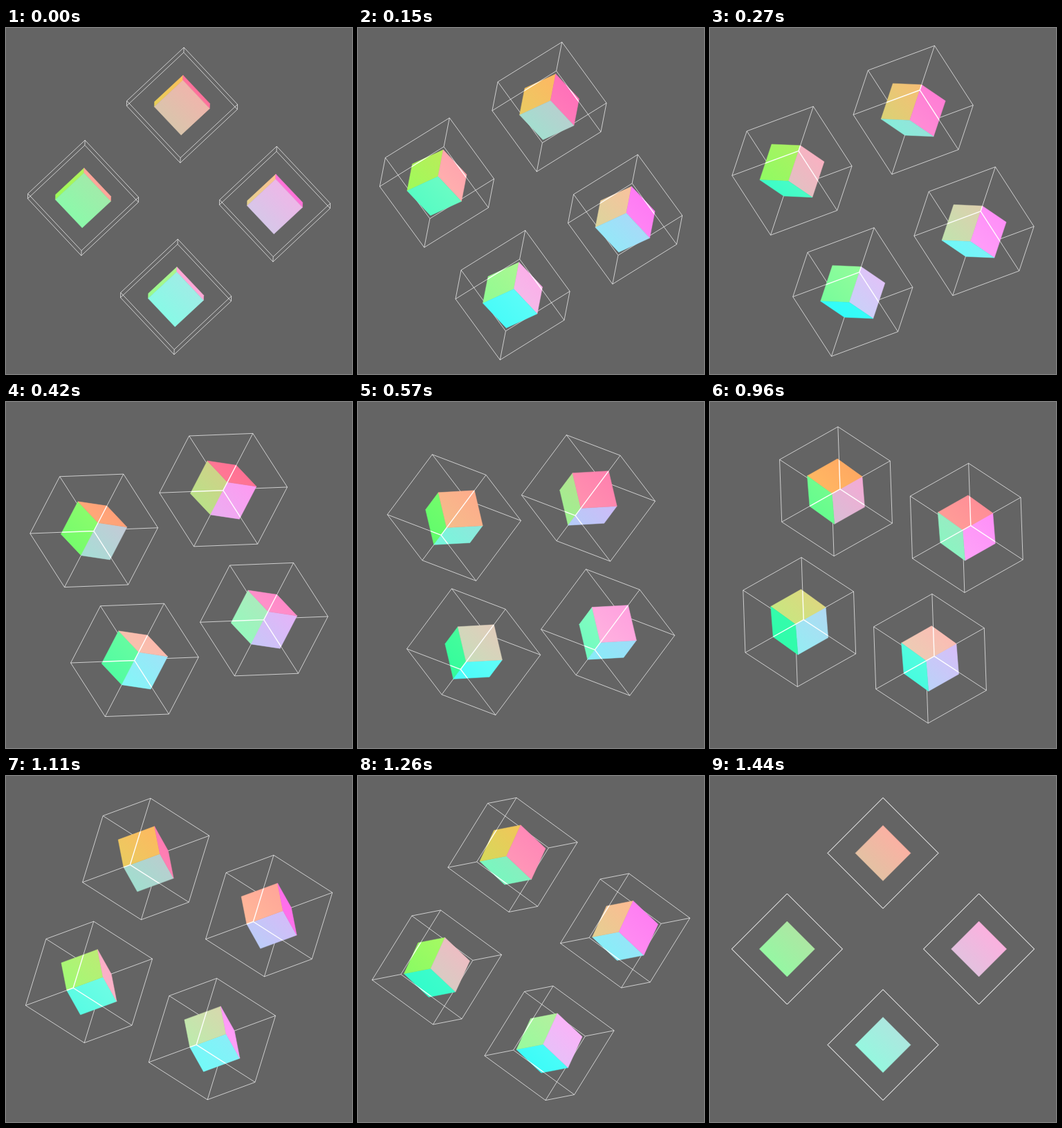
Recreate the animation shown at these times as an HTML page with a canvas. Size 500 by 500 pixels, loop 1.47 s.

```html
<!DOCTYPE html>
<html>
<head>
<meta charset="utf-8">
<style>
html, body { margin: 0; width: 100%; height: 100%; overflow: hidden; background: #646464; }
canvas { display: block; width: 500px; height: 500px; }
</style>
</head>
<body>
<canvas id="stage" width="500" height="500"></canvas>
<script>
const ctx = document.getElementById('stage').getContext('2d');
const STEP = 30, STEPS = 49, MID = 250;
const ORBIT = 98 * Math.SQRT2;
const WIRE = 40 * Math.SQRT2, SOLID = WIRE / 2; // half sides
const SIGNS = [-1, 1], EPS = 1e-6;

// Cube axes tilted about x, then turned in the picture plane; z faces the viewer.
function cubeAxes(turn, tilt) {
  const h = Math.SQRT1_2;
  const c = Math.cos(turn), s = Math.sin(turn);
  return [[h, h, 0], [-h, h, 0], [0, 0, 1]].map(([x, y, z]) => {
    const y2 = y * Math.cos(tilt) + z * Math.sin(tilt);
    const z2 = z * Math.cos(tilt) - y * Math.sin(tilt);
    return [x * c - y2 * s, x * s + y2 * c, z2];
  });
}

// Projected sum of signed axes around a centre.
function corner([cx, cy], half, terms) {
  let x = cx, y = cy;
  for (const [sign, axis] of terms) {
    x += half * sign * axis[0];
    y += half * sign * axis[1];
  }
  return [x, y];
}

function wirePath(center, axes, frontOnly) {
  const path = new Path2D();
  axes.forEach((along, k) => {
    const u = axes[(k + 1) % 3], v = axes[(k + 2) % 3];
    for (const su of SIGNS) for (const sv of SIGNS) {
      if (frontOnly && su * u[2] < EPS && sv * v[2] < EPS) continue;
      path.moveTo(...corner(center, WIRE, [[su, u], [sv, v], [-1, along]]));
      path.lineTo(...corner(center, WIRE, [[su, u], [sv, v], [1, along]]));
    }
  });
  return path;
}

// Coloured light: red from upper right, green from the left, blue from lower right.
function shade(nx, ny, px, py) {
  const x = (px - MID) / ORBIT, y = (py - MID) / ORBIT;
  const rgb = [
    200 + 81 * (nx - ny) + 39 * (x - y),
    212 - 57 * nx + 33 * ny - 27 * (x - y),
    193 + 44 * nx + 59 * ny + 30 * (x + y)
  ];
  const limits = [[45, 255], [105, 252], [90, 248]];
  return `rgb(${rgb.map((v, i) => Math.round(Math.min(limits[i][1], Math.max(limits[i][0], v))))})`;
}

function drawSolid(center, axes) {
  const outline = new Path2D();
  axes.forEach((axis, k) => {
    if (Math.abs(axis[2]) < EPS) return;
    const sign = Math.sign(axis[2]);
    const u = axes[(k + 1) % 3], v = axes[(k + 2) % 3];
    const face = new Path2D();
    for (const [su, sv] of [[-1, -1], [1, -1], [1, 1], [-1, 1]]) {
      face.lineTo(...corner(center, SOLID, [[sign, axis], [su, u], [sv, v]]));
    }
    face.closePath();

    const [mx, my] = corner(center, SOLID, [[sign, axis]]);
    const r = 28;
    const fill = ctx.createLinearGradient(mx - r, my + r, mx + r, my - r);
    for (const end of SIGNS) {
      fill.addColorStop((end + 1) / 2,
        shade(sign * axis[0], sign * axis[1], mx + end * r, my - end * r));
    }
    ctx.fillStyle = ctx.strokeStyle = fill;
    ctx.lineWidth = 0.5;
    ctx.fill(face);
    ctx.stroke(face);
    outline.addPath(face);
  });
  return outline;
}

function drawCube(center, wireAxes, solidAxes) {
  ctx.strokeStyle = 'rgba(255,255,255,0.68)';
  ctx.lineWidth = 1;
  ctx.stroke(wirePath(center, wireAxes, false));

  const outline = drawSolid(center, solidAxes);

  ctx.save();
  ctx.clip(outline);
  ctx.strokeStyle = 'rgba(255,255,255,0.95)';
  ctx.lineWidth = 1.4;
  ctx.stroke(wirePath(center, wireAxes, true));
  ctx.restore();
}

function draw(ms) {
  const step = Math.floor(ms / STEP) % STEPS;
  const turn = (step + 1) / STEPS * Math.PI / 2;
  const wireAxes = cubeAxes(turn, 2 * turn);
  const solidAxes = cubeAxes(turn, 4 * turn);

  ctx.fillStyle = '#646464';
  ctx.fillRect(0, 0, 500, 500);
  for (let i = 0; i < 4; i++) {
    const angle = turn + i * Math.PI / 2;
    const center = [MID + ORBIT * Math.cos(angle), MID + ORBIT * Math.sin(angle)];
    drawCube(center, wireAxes, solidAxes);
  }
}

const start = performance.now();
function tick() {
  draw(performance.now() - start);
  requestAnimationFrame(tick);
}
tick();
</script>
</body>
</html>
```
